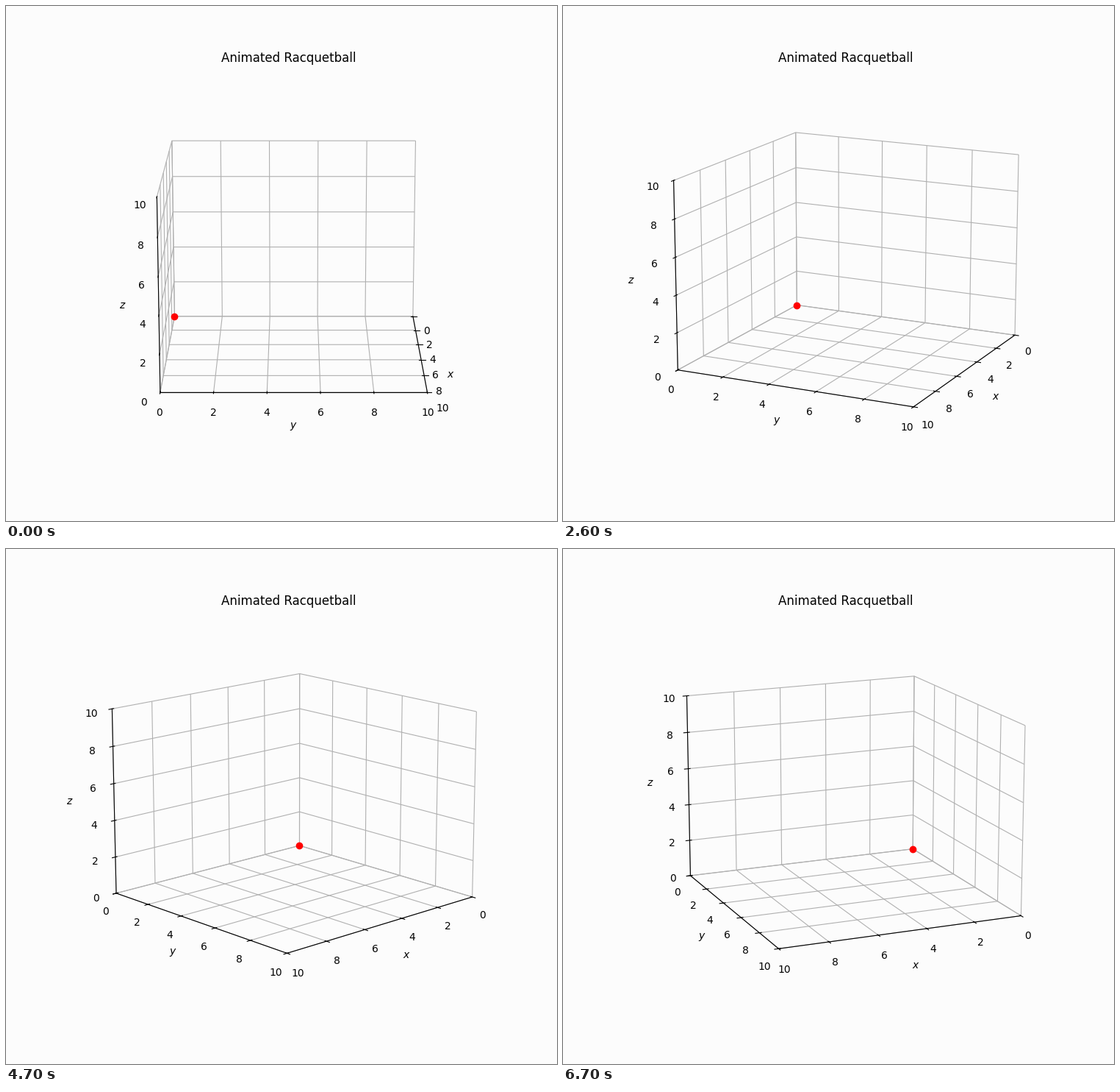
A matplotlib script for the animation above (6800 ms loop, 750 by 700 pixels).

```python
import matplotlib.pyplot as plt
from matplotlib.animation import FuncAnimation

FRAMES = 68
INTERVAL = 100
ELEV = 15
BACKGROUND = "#fcfcfc"

fig = plt.figure(figsize=(7.5, 7), dpi=100, facecolor=BACKGROUND)
ax = fig.add_subplot(projection="3d", facecolor=BACKGROUND)
ax.set_title("Animated Racquetball")
ax.set(xlim=(0, 10), ylim=(0, 10), zlim=(0, 10),
       xlabel="$x$", ylabel="$y$", zlabel="$z$")

for axis in (ax.xaxis, ax.yaxis, ax.zaxis):
    axis.set_pane_color((1, 1, 1, 0))

ball, = ax.plot([0], [0], [0], "ro")


def update(frame):
    """Turn the camera one degree per step around the court."""
    ax.view_init(elev=ELEV, azim=frame)
    return ball,


anim = FuncAnimation(fig, update, frames=FRAMES, interval=INTERVAL,
                     init_func=lambda: update(0), repeat=True, repeat_delay=0)
plt.show()
```
